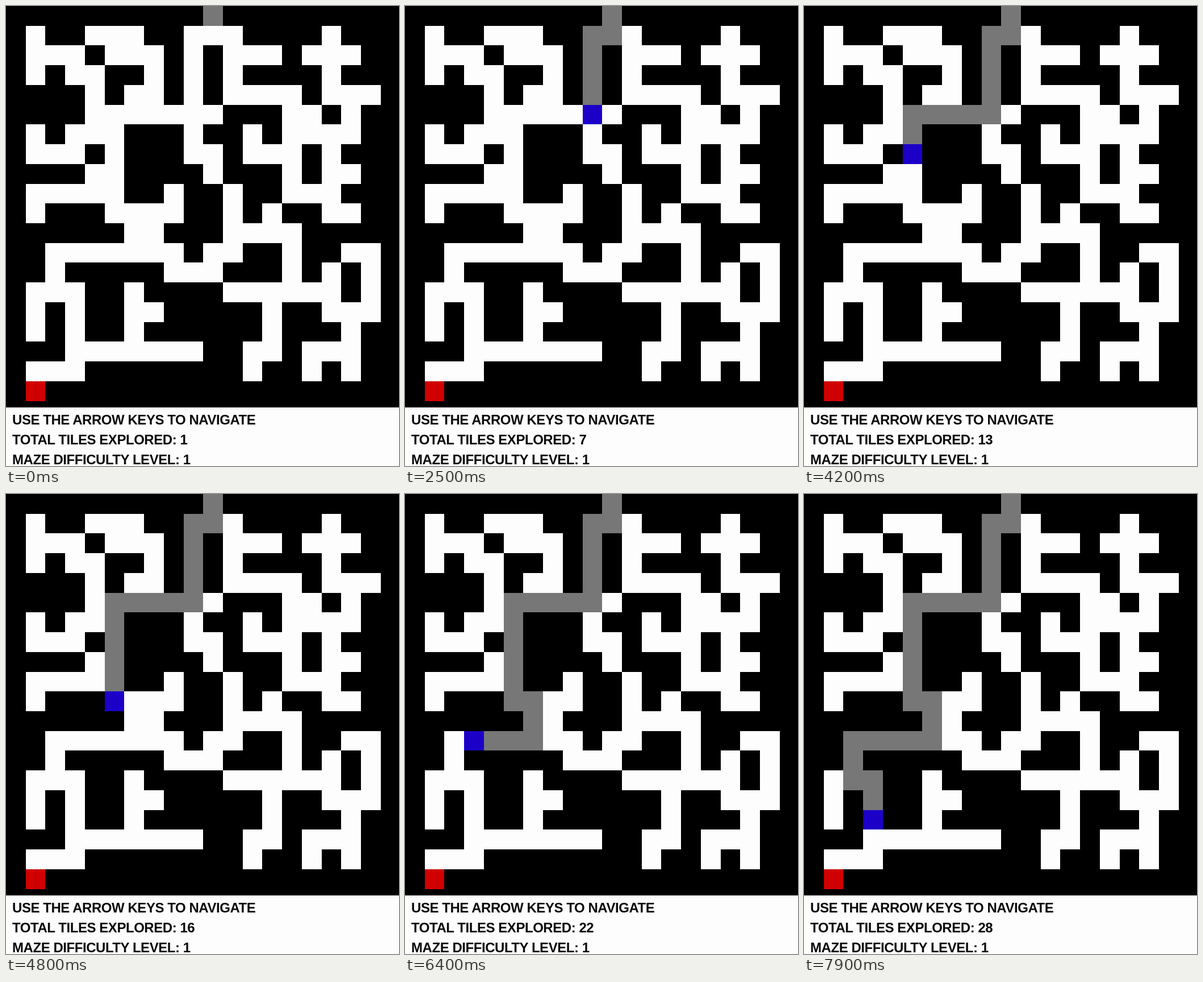
Write an HTML page that moves like this. It is 692 px wide and 809 px high and loops after 8000 ms.

```html
<!DOCTYPE html>
<html lang="en">
<head>
<meta charset="utf-8">
<title>Maze</title>
<style>
  html, body { margin: 0; width: 100%; height: 100%; overflow: hidden; background: #000; }
  svg { display: block; width: 692px; height: 809px; }
  rect { shape-rendering: crispEdges; }
  text { font: bold 24px "Liberation Sans", Arial, sans-serif; letter-spacing: -.45px; fill: #0a0a0a; }
</style>
</head>
<body>
<svg id="stage" viewBox="0 0 692 809" xmlns="http://www.w3.org/2000/svg">
  <rect width="692" height="809" fill="#000"/>
  <g id="maze"></g>
  <rect y="706" width="692" height="103" fill="#fdfdfd"/>
  <text x="11" y="736.4">USE THE ARROW KEYS TO NAVIGATE</text>
  <text x="11" y="771.1" id="count"></text>
  <text x="11" y="805.8">MAZE DIFFICULTY LEVEL: 1</text>
</svg>
<script>
const LOOP = 8000, TICK = 100, STEP = 256, ORIGIN = 883;
const CELL = 34.73;
const WHITE = '#fdfdfd', GREY = '#777', BLUE = '#1c00c8', RED = '#d00000';

const MAP = [
  '..........#.........',
  '.#..###..###....#...',
  '.###.###.#.###.###..',
  '.#.##..#.#.#....#...',
  '....#.##.#.####.###.',
  '....#######...##.#..',
  '.#.###...#..#.####..',
  '.###.#...##.###.#...',
  '....##....#...#.##..',
  '.#####..#..#..###...',
  '.#...####..#.#..##..',
  '......##...####.....',
  '..#######.##..#..##.',
  '..#.....###...#.#.#.',
  '.###..#....######.#.',
  '.#.#..##.....#..###.',
  '.#.#..#......#...#..',
  '...#######..##.###..',
  '.###........#..#.#..',
  '.#..................'
];
const MOVES = 'DLDDDDLLLLDDDDDRDDLLLLDDRDD';
const DIRS = { D: [0, 1], L: [-1, 0], R: [1, 0] };

const maze = document.getElementById('maze');
const count = document.getElementById('count');
const edge = k => Math.round(CELL * k);

function addTile(x, y, fill) {
  const r = document.createElementNS('http://www.w3.org/2000/svg', 'rect');
  const box = { x: edge(x), y: edge(y), width: edge(x + 1) - edge(x), height: edge(y + 1) - edge(y), fill };
  for (const k in box) r.setAttribute(k, box[k]);
  return maze.appendChild(r);
}

const tiles = {};
MAP.forEach((row, y) => [...row].forEach((c, x) => {
  if (c === '#') tiles[[x, y]] = addTile(x, y, y === 19 ? RED : WHITE);
}));

let pos = [10, 0];
const path = [tiles[pos]];
for (const m of MOVES) {
  pos = pos.map((v, i) => v + DIRS[m][i]);
  path.push(tiles[pos]);
}

let shown = 0;
function draw(ms) {
  // moves become visible on the next 100 ms tick
  const t = Math.floor((ms % LOOP) / TICK) * TICK;
  const n = Math.min(path.length, Math.max(1, Math.floor((t - ORIGIN) / STEP) + 1));
  if (n === shown) return;
  shown = n;
  path.forEach((tile, i) => {
    const fill = i >= n ? WHITE : i === n - 1 && i > 0 ? BLUE : GREY;
    tile.setAttribute('fill', fill);
  });
  count.textContent = 'TOTAL TILES EXPLORED: ' + n;
}

const start = performance.now();
function frame() {
  draw(performance.now() - start);
  requestAnimationFrame(frame);
}
frame();
</script>
</body>
</html>
```
